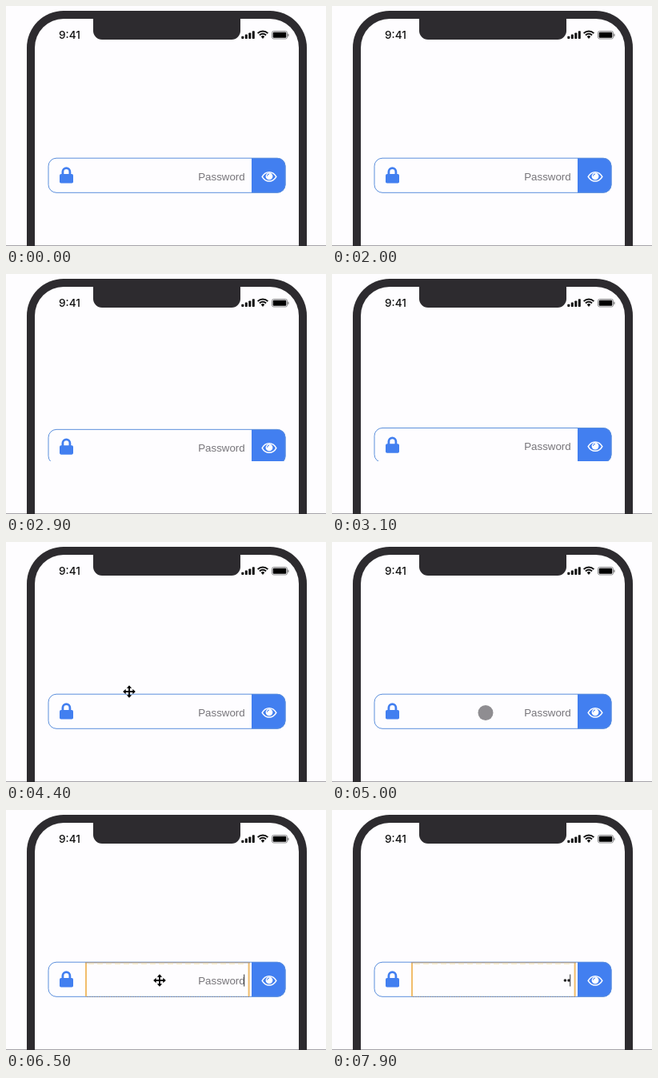
Write an HTML page with a canvas that moves like this. It is 400 by 300 pixels and loops after 8 s.

```html
<!DOCTYPE html>
<html lang="en">
<head>
<meta charset="utf-8">
<title>Password field</title>
<style>
html, body { margin: 0; width: 100%; height: 100%; overflow: hidden; background: #fefdff; }
canvas { display: block; width: 400px; height: 300px; }
</style>
</head>
<body>
<canvas id="stage"></canvas>
<script>
const LOOP = 8000, STEP = 100;
const BLUE = '#427ff0', DARK = '#2d2b2f', PAPER = '#fefdff', INK = '#111';
const canvas = document.getElementById('stage');
const ratio = window.devicePixelRatio || 1;
canvas.width = 400 * ratio;
canvas.height = 300 * ratio;
const c = canvas.getContext('2d');
c.scale(ratio, ratio);

function rect(x, y, w, h, color) {
  c.fillStyle = color;
  c.fillRect(x, y, w, h);
}

function round(x, y, w, h, r, color) {
  c.beginPath();
  c.roundRect(x, y, w, h, r);
  c.fillStyle = color;
  c.fill();
}

function disc(x, y, r, color) {
  c.beginPath();
  c.arc(x, y, r, 0, Math.PI * 2);
  c.fillStyle = color;
  c.fill();
}

function text(str, x, y, font, color, align) {
  c.font = font;
  c.fillStyle = color;
  c.textAlign = align;
  c.fillText(str, x, y);
}

function statusBar() {
  text('9:41', 66, 41.3, '500 13.6px Inter, sans-serif', INK, 'left');
  for (let i = 0; i < 4; i++) {
    const h = 3.2 + i * 2.2;
    round(294.3 + i * 4.5, 41 - h, 3, h, 0.8, INK);
  }
  // Wi-Fi: two arcs over a small wedge
  const a = Math.PI * 0.25, b = Math.PI * 0.75;
  c.strokeStyle = INK;
  c.lineWidth = 2;
  for (const r of [9, 5.7]) {
    c.beginPath();
    c.arc(321, 40.5, r, -b, -a);
    c.stroke();
  }
  c.beginPath();
  c.moveTo(321, 41);
  c.arc(321, 40.5, 3.2, -b, -a);
  c.fillStyle = INK;
  c.fill();
  // Battery
  c.beginPath();
  c.roundRect(332.5, 31.5, 19, 9.5, 2);
  c.strokeStyle = '#8c8c8e';
  c.lineWidth = 1;
  c.stroke();
  round(333.7, 32.7, 16.6, 7.1, 1, '#000');
  round(352.3, 34.5, 1.2, 3.5, 0.6, '#777');
}

function phone() {
  rect(0, 0, 400, 300, PAPER);
  round(26, 6, 350, 360, 46, DARK);
  round(36, 16, 330, 350, 36, PAPER);
  round(109, 14, 184, 28, [0, 0, 11, 11], DARK);
  rect(0, 299, 26, 1, '#a5a3a8');
  rect(36, 299, 330, 1, '#a5a3a8');
  rect(376, 299, 24, 1, '#a5a3a8');
  statusBar();
}

function lock() {
  c.beginPath();
  c.moveTo(70.9, 211);
  c.lineTo(70.9, 207.2);
  c.arc(75.4, 207.2, 4.5, Math.PI, 0);
  c.lineTo(79.9, 211);
  c.strokeStyle = BLUE;
  c.lineWidth = 2.8;
  c.stroke();
  round(67, 210, 17, 11.5, 1.8, BLUE);
}

function eye() {
  const x = 329, y = 213.4;
  c.beginPath();
  c.moveTo(x - 8.8, y);
  c.bezierCurveTo(x - 4.6, y - 7.6, x + 4.6, y - 7.6, x + 8.8, y);
  c.bezierCurveTo(x + 4.6, y + 7.6, x - 4.6, y + 7.6, x - 8.8, y);
  c.closePath();
  c.strokeStyle = '#fff';
  c.lineWidth = 1.5;
  c.stroke();
  disc(x, y - 0.6, 4.4, '#fff');
  c.beginPath();
  c.arc(x, y - 0.8, 2.5, Math.PI, Math.PI * 1.5);
  c.strokeStyle = BLUE;
  c.lineWidth = 1;
  c.stroke();
}

function focusRing() {
  rect(99, 191, 2, 42, '#f1bd6c');
  rect(302.6, 191, 2, 42, '#f1bd6c');
  rect(99, 190, 206, 1.4, '#a09b98');
  for (let x = 103; x < 300; x += 11) rect(x, 191.7, 7, 1, '#f8e6b4');
  for (let x = 101; x < 303; x += 3) rect(x, 233, 2, 1, '#8b8f9b');
}

function field(dy, focused, dots, caret) {
  c.save();
  c.beginPath();
  c.rect(52, 189, 298, 45);
  c.clip();
  c.translate(0, dy);
  round(307, 190, 42.5, 43.5, [0, 10, 10, 0], BLUE);
  c.beginPath();
  c.roundRect(53, 190.2, 296, 43.1, 10);
  c.strokeStyle = '#5b8fdc';
  c.lineWidth = 1;
  c.stroke();
  lock();
  eye();
  if (focused) focusRing();
  if (!dots) {
    text('Password', 298.7, 217.6, '13.333px "Liberation Sans", Arial, sans-serif', '#77757a', 'right');
  }
  for (let i = 0; i < dots; i++) disc(296 - i * 4.6, 213, 1.8, '#222');
  if (caret) rect(297.2, 205.5, 1, 15, '#333');
  c.restore();
}

function moveCursor(x, y) {
  c.save();
  c.translate(x, y);
  for (let i = 0; i < 4; i++) {
    c.rotate(Math.PI / 2);
    rect(-0.9, -5.5, 1.8, 5.8, '#000');
    c.beginPath();
    c.moveTo(0, -7.8);
    c.lineTo(3.2, -4.3);
    c.lineTo(-3.2, -4.3);
    c.fillStyle = '#000';
    c.fill();
  }
  c.restore();
}

function pointer(t) {
  if (t < 4400 || t >= 6900) return;
  if (t >= 4900 && t < 5100) {
    disc(192, 213.5, 9.5, '#8f8d91');
    return;
  }
  const p = Math.min(1, (t - 4400) / 400);
  const e = p * p * (3 - 2 * p);
  moveCursor(154 + 38 * e, 187 + 26 * e);
}

function draw(t) {
  const dy = t > 2650 && t < 3200 ? 4.2 * Math.sin(Math.PI * (t - 2650) / 550) : 0;
  const dots = t >= 6900 ? 2 : t >= 6700 ? 1 : 0;
  const focused = t >= 5100;
  // Typing restarts the blink
  const since = dots === 2 ? 6900 : dots === 1 ? 6700 : 5200;
  const caret = t >= since && (t - since) % 1000 < 500;
  phone();
  field(dy, focused, dots, caret);
  pointer(t);
}

const start = performance.now();
function tick() {
  const t = (performance.now() - start) % LOOP;
  draw(Math.floor(t / STEP) * STEP);
  requestAnimationFrame(tick);
}
tick();
</script>
</body>
</html>
```
